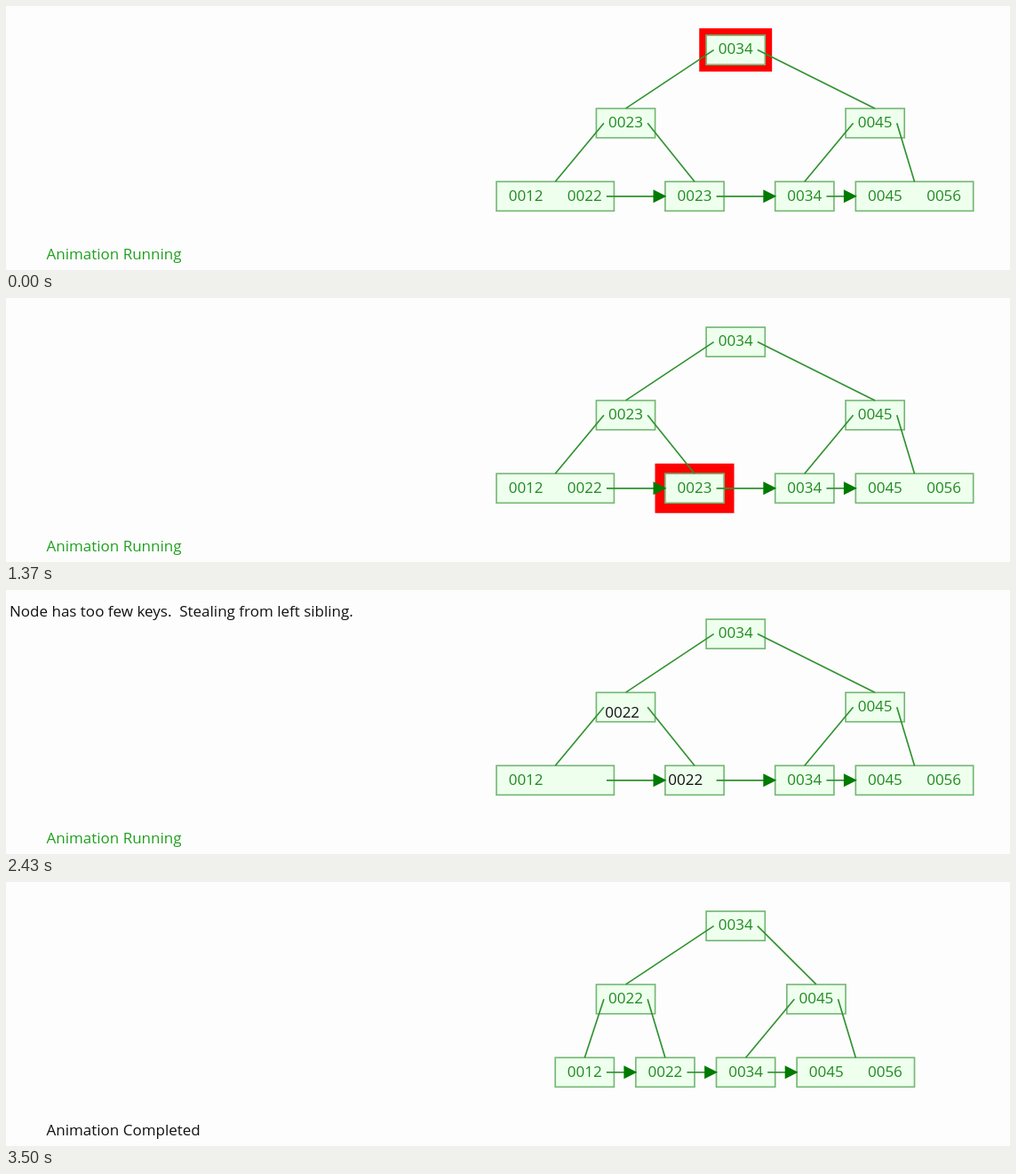
Animation, 1130 px wide and 298 px high, one loop 3.53 s. Source, as an HTML page with a canvas:

```html
<!DOCTYPE html>
<html lang="en">
<head>
<meta charset="utf-8">
<title>B+ tree deletion</title>
<style>
  html, body { margin: 0; width: 100%; height: 100%; overflow: hidden; background: #fdfdfd; }
  canvas { display: block; }
</style>
</head>
<body>
<canvas id="stage" width="1130" height="298"></canvas>
<script>
const ctx = document.getElementById('stage').getContext('2d');
const LOOP = 3530, TICK = 100 / 3, BLOCK = 12;
const UNIT = 1.655, KEY_W = 40 * UNIT, NODE_H = 20 * UNIT;
const ROWS = [49.6, 132.2, 214.8];
// Ticks at which each step of the deletion begins
const STEP = { rootEdge: 2, child: 14, childEdge: 26, leaf: 38, erase: 50, steal: 62, layout: 74, done: 86 };
const GREEN = '#1f8a1f', EDGE = '#2f922f', INK = '#111111', RED = '#ff0000';

const mix = (a, b, p) => a + (b - a) * p;
const progress = (tick, start) => Math.min(1, Math.max(0, (tick - start) / BLOCK));
const during = (tick, from, to) => tick >= from && tick < to;

// Triangle wave from 0 to 4 and back, one unit every 7 ticks
const pulse = tick => 4 - Math.abs(((tick + 49) / 7) % 8 - 4);

function text(str, x, y, color, align = 'center') {
  ctx.fillStyle = color;
  ctx.textAlign = align;
  ctx.fillText(str, x, y);
}

function makeNode(x, row, ...keys) {
  return { x, y: ROWS[row], keys, half: keys.length * KEY_W / 2 };
}

function drawNode(node, glow) {
  const { x, y, keys, half } = node;
  const box = pad => [x - half - pad, y - NODE_H / 2 - pad, 2 * (half + pad), NODE_H + 2 * pad];
  if (glow) {
    ctx.fillStyle = RED;
    ctx.fillRect(...box(glow));
  }
  ctx.fillStyle = '#eeffee';
  ctx.fillRect(...box(0));
  ctx.strokeStyle = '#74b874';
  ctx.lineWidth = UNIT;
  ctx.strokeRect(...box(0));
  keys.forEach((key, i) => text(key, x - half + (i + 0.5) * KEY_W, y + 4.8, GREEN));
}

function line(x1, y1, x2, y2, color, width) {
  ctx.strokeStyle = color;
  ctx.lineWidth = width;
  ctx.beginPath();
  ctx.moveTo(x1, y1);
  ctx.lineTo(x2, y2);
  ctx.stroke();
}

function drawEdge(parent, child, side, glow) {
  const ends = [parent.x + side * (parent.half - 8.5), parent.y, child.x, child.y - NODE_H / 2];
  if (glow) line(...ends, RED, glow);
  line(...ends, EDGE, UNIT);
}

function drawArrow(from, to) {
  const tip = to.x - to.half + 1.5, y = from.y;
  line(from.x + from.half - 8.5, y, tip - 5, y, EDGE, UNIT);
  ctx.fillStyle = '#007a00';
  ctx.beginPath();
  ctx.moveTo(tip, y);
  ctx.lineTo(tip - 9 * UNIT, y - 4.5 * UNIT);
  ctx.lineTo(tip - 9 * UNIT, y + 4.5 * UNIT);
  ctx.fill();
}

function draw(tick) {
  const moved = progress(tick, STEP.layout) * KEY_W;
  const stealing = during(tick, STEP.steal, STEP.layout);
  const settled = tick >= STEP.layout;
  const childKey = settled ? '0022' : stealing ? '' : '0023';
  const leafKey = settled ? '0022' : tick >= STEP.erase ? '' : '0023';
  const firstKeys = settled ? ['0012'] : ['0012', stealing ? '' : '0022'];

  const root = makeNode(821.2, 0, '0034');
  const left = makeNode(697.5, 1, childKey);
  const right = makeNode(978.1 - moved, 1, '0045');
  const leaves = [
    makeNode(618.2 + moved / 2, 2, ...firstKeys),
    makeNode(775 - moved / 2, 2, leafKey),
    makeNode(898.8 - moved, 2, '0034'),
    makeNode(1022.5 - moved, 2, '0045', '0056')
  ];

  const swell = pulse(tick);
  const nodeGlow = (from, to) => during(tick, from, to) && 6.2 + swell * UNIT;
  const edgeGlow = (from, to) => during(tick, from, to) && (3 + swell / 2) * UNIT;

  ctx.fillStyle = '#fdfdfd';
  ctx.fillRect(0, 0, 1130, 298);
  ctx.font = '17px "Open Sans", "Noto Sans", sans-serif';

  drawNode(root, nodeGlow(0, STEP.child));
  drawNode(left, nodeGlow(STEP.child, STEP.leaf));
  drawNode(right);
  leaves.forEach((leaf, i) => drawNode(leaf, i === 1 && nodeGlow(STEP.leaf, STEP.steal)));

  drawEdge(root, left, -1, edgeGlow(STEP.rootEdge, STEP.child));
  drawEdge(root, right, 1);
  drawEdge(left, leaves[0], -1);
  drawEdge(left, leaves[1], 1, edgeGlow(STEP.childEdge, STEP.leaf));
  drawEdge(right, leaves[2], -1);
  drawEdge(right, leaves[3], 1);
  for (let i = 0; i < 3; i++) drawArrow(leaves[i], leaves[i + 1]);

  if (stealing) {
    const p = progress(tick, STEP.steal);
    const startX = leaves[0].x + KEY_W / 2, startY = ROWS[2];
    for (const goal of [left, leaves[1]])
      text('0022', mix(startX, goal.x, p), mix(startY, goal.y, p) + 4.8, INK);
    text('Node has too few keys.  Stealing from left sibling.', 4, 30, INK, 'left');
  }
  if (tick < STEP.done) text('Animation Running', 45.5, 286, '#1ea01e', 'left');
  else text('Animation Completed', 45.5, 286, INK, 'left');
}

function loop() {
  draw(Math.floor((performance.now() % LOOP + 4) / TICK));
  requestAnimationFrame(loop);
}
loop();
</script>
</body>
</html>
```
